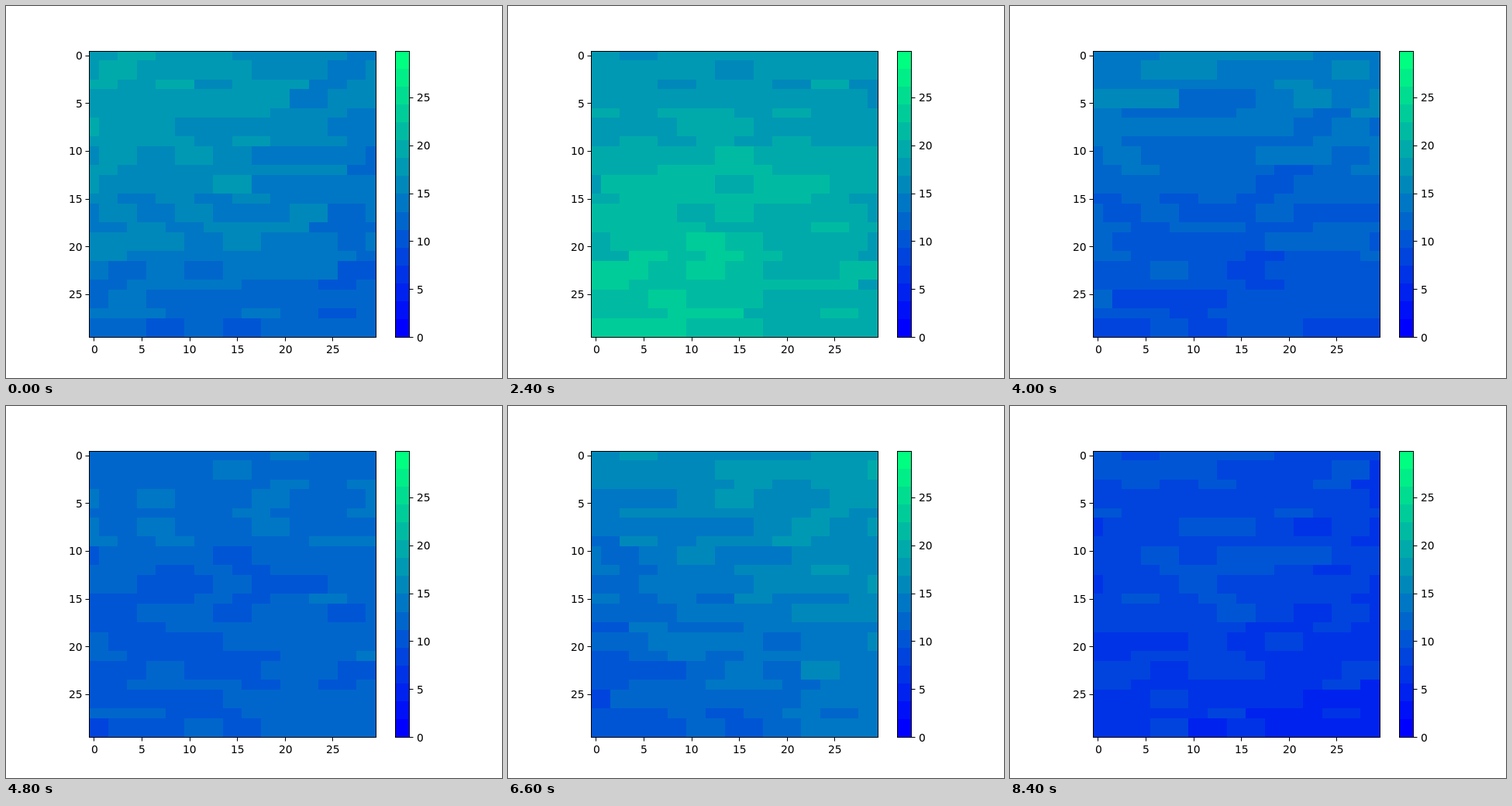
Write an HTML page with a canvas that moves like this. It is 640 by 480 pixels and loops after 8600 ms.

```html
<!DOCTYPE html>
<html lang="en">
<head>
<meta charset="utf-8">
<title>Heat map</title>
<style>
html, body { margin: 0; width: 100%; height: 100%; overflow: hidden; background: #fff; }
canvas { display: block; }
</style>
</head>
<body>
<canvas id="stage" width="640" height="480"></canvas>
<script>
const ctx = document.getElementById('stage').getContext('2d');
const LEFT = 107.2, TOP = 57.6, SIZE = 369.6, CELL = SIZE / 30;
const BOTTOM = TOP + SIZE, UNIT = 12.38;
const STEP = 200, LOOP = 8600, ROUGH = .6;

// Key poses of the field: levels at the four corners and a bulge in the middle.
const keys = [
  { at: 0, nw: 10.2, ne: 7.5, sw: 6, se: 5.2, bulge: .7 },
  { at: 2400, nw: 8, ne: 8.8, sw: 12.2, se: 10.2, bulge: .7 },
  { at: 4000, nw: 7.5, ne: 8, sw: 4.6, se: 4.2, bulge: -.4 },
  { at: 5400, nw: 5.8, ne: 5, sw: 5, se: 7.1, bulge: .3 },
  { at: 6600, nw: 7.9, ne: 9.2, sw: 4.3, se: 7, bulge: 0 },
  { at: 7400, nw: 5.8, ne: 7.3, sw: 2, se: 2, bulge: -1.6 },
  { at: 8400, nw: 4.4, ne: 4, sw: 3.1, se: 2.6, bulge: .6 }
];

const mix = (a, b, k) => a + (b - a) * k;
const clamp = (v, lo, hi) => Math.max(lo, Math.min(hi, v));
const color = level => {
  const g = level / 15;
  return `rgb(0,${Math.round(255 * g)},${Math.round(255 - 127.5 * g)})`;
};
const random = seed => {
  const n = Math.sin(seed * 127.1 + 311.7) * 43758.5453;
  return n - Math.floor(n);
};

// Brick-like patches: rows of height 1 and 2 in turn, staggered by half a patch.
function makePatches() {
  const list = [];
  for (let y = 0; y < 30; y += y % 3 ? 2 : 1) {
    const h = y % 3 ? 2 : 1;
    let x = 0;
    for (let edge = h === 1 ? 3 : 1; x < 30; edge += 4) {
      const shift = y - edge / 12 > 16.6 ? 1 : 0;
      const end = Math.min(30, edge + shift);
      list.push({ x, y, end, h, phase: random(list.length) * 2 * Math.PI });
      x = end;
    }
  }
  return list;
}
const patches = makePatches();

function field(key, u, v) {
  const plane = mix(mix(key.nw, key.ne, u), mix(key.sw, key.se, u), v);
  return plane + key.bulge * Math.sin(Math.PI * u) * Math.sin(Math.PI * v);
}

function drawMap(time) {
  const n = Math.max(1, keys.findIndex(k => k.at >= time));
  const a = keys[n - 1], b = keys[n];
  const k = (time - a.at) / (b.at - a.at);
  const px = i => Math.round(LEFT + i * CELL), py = i => Math.round(TOP + i * CELL);
  for (const p of patches) {
    const u = (p.x + p.end) / 60, v = (p.y + p.h / 2) / 30;
    const level = mix(field(a, u, v), field(b, u, v), k)
      + ROUGH * Math.sin(p.phase + time / 900);
    ctx.fillStyle = color(clamp(Math.round(level), 0, 15));
    ctx.fillRect(px(p.x), py(p.y), px(p.end) - px(p.x), py(p.y + p.h) - py(p.y));
  }
  ctx.strokeRect(107.5, 58.5, 370, 369);
}

// Text starts on a whole pixel; align is the share of its width left of x.
function label(text, x, y, align) {
  const width = ctx.measureText(text).width;
  ctx.fillText(text, Math.round(x - width * align), Math.round(y));
}

function line(x, y, dx, dy) {
  ctx.beginPath();
  ctx.moveTo(Math.round(x) + .5, Math.round(y) + .5);
  ctx.lineTo(Math.round(x) + .5 + dx, Math.round(y) + .5 + dy);
  ctx.stroke();
}

function drawFrame() {
  ctx.fillStyle = '#fff';
  ctx.fillRect(0, 0, 640, 480);
  for (let i = 0; i < 16; i++) {
    const y = Math.round(BOTTOM - (i + 1) * SIZE / 16);
    ctx.fillStyle = color(i);
    ctx.fillRect(502, y, 18, Math.round(BOTTOM - i * SIZE / 16) - y);
  }
  ctx.strokeStyle = ctx.fillStyle = '#000';
  ctx.lineWidth = 1;
  ctx.strokeRect(502.5, 58.5, 18, 369);
  ctx.font = '13.89px "DejaVu Sans", sans-serif';
  for (let v = 0; v <= 25; v += 5) {
    const x = LEFT + (v + .5) * CELL, y = TOP + (v + .5) * CELL, bar = BOTTOM - v * UNIT;
    line(x, BOTTOM, 0, 5);
    line(LEFT, y, -5, 0);
    line(520, bar, 5, 0);
    label(v, x + .57, 448, .5);
    label(v, 98.6, y + 5.5, 1);
    label(v, 530, bar + 5.5, 0);
  }
}

let shown = -1;
function tick() {
  const step = Math.floor(performance.now() % LOOP / STEP);
  if (step !== shown) drawMap((shown = step) * STEP);
  requestAnimationFrame(tick);
}

drawFrame();
tick();
</script>
</body>
</html>
```
